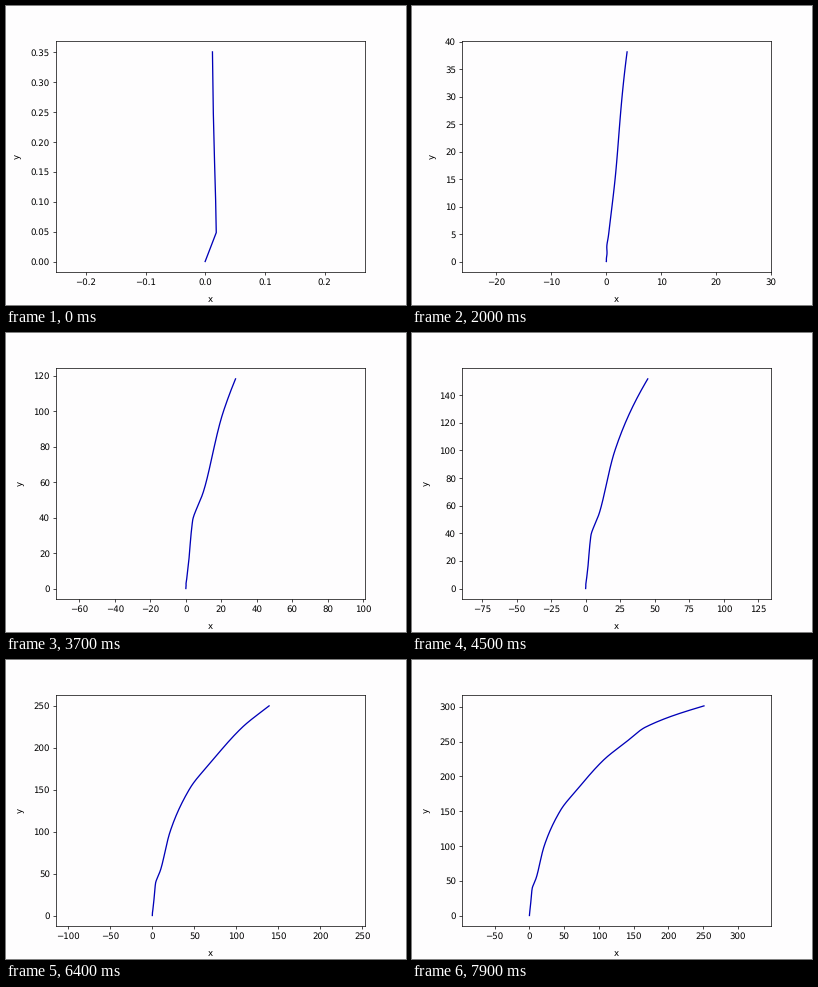
A matplotlib script for the animation above (8 s loop, 400 by 299 pixels).

```python
import numpy as np
import matplotlib.pyplot as plt
from matplotlib.animation import FuncAnimation

W, H, DPI = 400, 299, 62.5
FRAMES, INTERVAL = 80, 100
SUBSTEPS = 5  # trail points added per frame
PAPER = "#fefdfe"

# Turning points of the trail: time in frames, x, y
KEYS = np.array([
    (0, 0, 0), (1, -.008, .351), (10, 1.58, 15.05), (21, 3.76, 38.15),
    (25.7, 10, 55), (34, 21.2, 100), (45.7, 44.2, 150.5), (54, 71, 184),
    (60.6, 107, 224), (65, 139, 249.6), (68.9, 167, 271), (80, 251, 301.5),
])


def ease_through(t, keys, values):
    """Cubic curve through the keys; harmonic tangents prevent overshoot."""
    step = np.diff(keys)
    rate = np.diff(values) / step
    inner = 2 * rate[:-1] * rate[1:] / (rate[:-1] + rate[1:])
    slope = np.concatenate(([1.5 * rate[0] - inner[0] / 2], inner,
                            [1.5 * rate[-1] - inner[-1] / 2]))
    i = np.clip(np.searchsorted(keys, t, side="right") - 1, 0, len(step) - 1)
    u = (t - keys[i]) / step[i]
    return (values[i] + u * u * (3 - 2 * u) * (values[i + 1] - values[i])
            + u * (1 - u) ** 2 * step[i] * slope[i]
            + u * u * (u - 1) * step[i] * slope[i + 1])


def wobble(t):
    """Sideways kick at launch, then one brief sway."""
    kick = 0.02 * (1 - np.exp(-20 * t))
    sway = 0.12 * np.sin(1.7 * (t - 1)) * np.exp(-((t - 3) / 1.2) ** 2)
    return kick + sway


times = np.arange(FRAMES * SUBSTEPS + 1) / SUBSTEPS
xs = ease_through(times, KEYS[:, 0], KEYS[:, 1]) + wobble(times)
ys = ease_through(times, KEYS[:, 0], KEYS[:, 2])

plt.rcParams["text.hinting"] = "none"
fig, ax = plt.subplots(figsize=(W / DPI, H / DPI), dpi=DPI, facecolor=PAPER)
fig.subplots_adjust(left=50 / W, right=359.4 / W, bottom=33 / H, top=263.6 / H)
ax.set_facecolor(PAPER)
box = ax.get_position()
ratio = box.width * W / (box.height * H)
line, = ax.plot([], [], color="#0000b8", lw=1.5)
ax.set_xlabel("x", labelpad=10)
ax.set_ylabel("y", labelpad=10)


def update(frame):
    n = (frame + 1) * SUBSTEPS + 1
    x, y = xs[:n], ys[:n]
    line.set_data(x, y)
    # Equal scale on both axes, 5% margin above and below
    low, high = y.min(), y.max()
    pad = 0.05 * (high - low)
    mid = (x.min() + x.max()) / 2
    half = ratio * (high - low + 2 * pad) / 2
    ax.set_xlim(mid - half, mid + half)
    ax.set_ylim(low - pad, high + pad)
    return line,


anim = FuncAnimation(fig, update, frames=FRAMES, interval=INTERVAL,
                     repeat=True, repeat_delay=0, blit=False)
plt.show()
```
